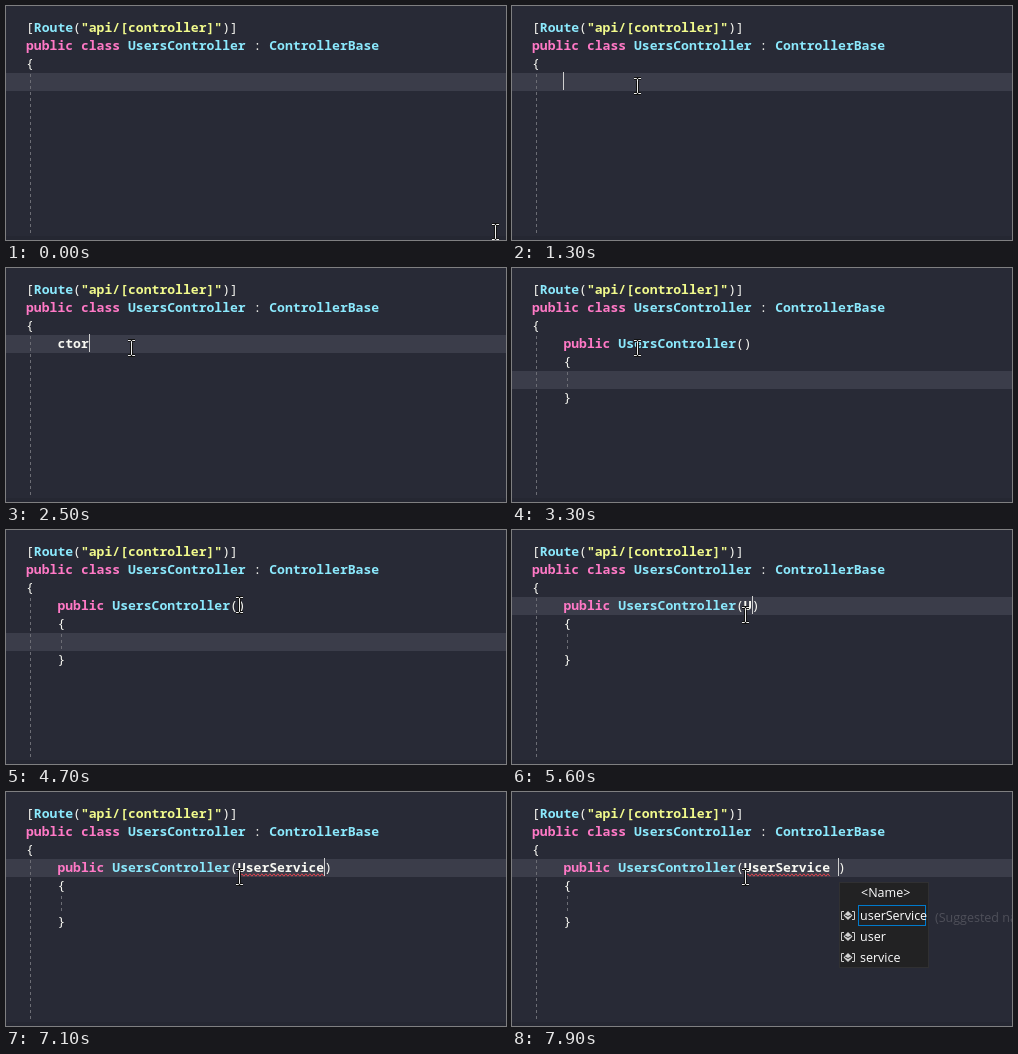
Animation, 500 px wide and 234 px high, one loop 8000 ms. Source, as an HTML page with a canvas:

```html
<!DOCTYPE html>
<html lang="en">
<head>
<meta charset="utf-8">
<title>Constructor snippet</title>
<style>
  html, body { margin: 0; width: 100%; height: 100%; overflow: hidden; background: #282a36; }
  canvas { display: block; }
</style>
</head>
<body>
<canvas id="stage" width="500" height="234"></canvas>
<script>
const ctx = document.getElementById('stage').getContext('2d', { alpha: false });
const LOOP = 8000, STEP = 100, LEFT = 20, LINE = 18, ROW = 21;
const CODE_FONT = '600 13.08px "Noto Sans Mono", monospace';
const PUNCTUATION_FONT = CODE_FONT.replace('600', '500');
const UI_FONT = '12.5px "Open Sans", sans-serif';
const PINK = '#ff79c6', CYAN = '#8be9fd', YELLOW = '#f1fa8c', WHITE = '#f8f8f2';
const ORANGE = '#f6c788', BLUE = '#007acc', DIM = '#565658', PANEL = '#222223';

// [start, typed text, where the text belongs]; each start also restarts the caret blink
const phases = [
  [300, '', 'class'], [1500, 'c', 'class'], [1700, 'ct', 'class'],
  [2200, 'cto', 'class'], [2300, 'ctor', 'class'],
  [2800, '', 'body'],
  [4800, '', 'args'], [5600, 'U', 'args'], [5800, 'Us', 'args'], [5900, 'User', 'args'],
  [7000, 'UserService', 'args'], [7400, 'UserService ', 'args'], [7500, 'UserService ', 'args']
];

// [time, x, y]
const pointerPath = [
  [0, 489, 226], [800, 125, 80], [3900, 125, 80],
  [4300, 184, 63], [4700, 233, 75], [4800, 233, 85], [LOOP, 233, 85]
];

const lineTop = line => 12 + LINE * line;

function rect(x, y, w, h, color) {
  ctx.fillStyle = color;
  ctx.fillRect(x, y, w, h);
}

function frame(x, y, w, h, color) {
  ctx.strokeStyle = color;
  ctx.lineWidth = 1;
  ctx.strokeRect(x + 0.5, y + 0.5, w - 1, h - 1);
}

function stroke(color, width, ...paths) {
  ctx.strokeStyle = color;
  ctx.lineWidth = width;
  ctx.beginPath();
  for (const [start, ...rest] of paths) {
    ctx.moveTo(...start);
    rest.forEach(p => ctx.lineTo(...p));
  }
  ctx.stroke();
}

function label(text, x, y, color = '#fff', font = UI_FONT) {
  ctx.font = font;
  ctx.fillStyle = color;
  ctx.fillText(text, x, y);
}

function columnX(col) {
  ctx.font = CODE_FONT;
  return LEFT + col * ctx.measureText('0').width;
}

function code(line, col, ...tokens) {
  for (const [text, color] of tokens) {
    const font = /\w/.test(text) ? CODE_FONT : PUNCTUATION_FONT;
    label(text, columnX(col), lineTop(line) + 14, color, font);
    col += text.length;
  }
}

function guide(x, top, bottom) {
  ctx.setLineDash([3, 3]);
  stroke('#6c6d75', 1, [[x + 0.5, top], [x + 0.5, bottom]]);
  ctx.setLineDash([]);
}

function diamond(x, y, r, color) {
  ctx.fillStyle = color;
  ctx.beginPath();
  ctx.moveTo(x - r, y);
  ctx.lineTo(x, y - r);
  ctx.lineTo(x + r, y);
  ctx.lineTo(x, y + r);
  ctx.fill();
}

function classIcon(x, y) {
  stroke(ORANGE, 1.2, [[x - 2, y - 1.5], [x + 4, y - 1.5]], [[x, y - 1], [x, y + 3.5], [x + 3, y + 3.5]]);
  diamond(x - 2.5, y - 2, 4.5, ORANGE);
  diamond(x + 4.5, y - 1, 2.8, ORANGE);
  diamond(x + 4, y + 4, 2.8, ORANGE);
}

function snippetIcon(x, y, color = '#c8c8c8') {
  frame(x - 5, y - 6, 11, 12, color);
}

function nameIcon(x, y) {
  stroke('#d0d0d0', 1,
    [[x - 4, y - 4.5], [x - 6.5, y - 4.5], [x - 6.5, y + 3.5], [x - 4, y + 3.5]],
    [[x + 4, y - 4.5], [x + 6.5, y - 4.5], [x + 6.5, y + 3.5], [x + 4, y + 3.5]]);
  diamond(x, y - 0.5, 4.5, '#d0d0d0');
  stroke(PANEL, 1, [[x - 3, y - 1], [x, y + 0.5], [x + 3, y - 1]]);
}

function filterBar(left, y, snippetColor) {
  const x = left + 14;
  const green = '#98e09a';
  for (const [sx, sy] of [[-1, -1], [1, -1], [-1, 1], [1, 1]]) {
    stroke(green, 1, [[x + sx * 6.5, y + sy * 3], [x + sx * 6.5, y + sy * 6.5], [x + sx * 3, y + sy * 6.5]]);
  }
  stroke(green, 2, [[x - 4, y], [x + 4, y]], [[x, y - 4], [x, y + 4]]);
  label('{ }', left + 38, y + 4, DIM);
  classIcon(left + 72, y);
  frame(left + 94, y - 1, 7, 5, DIM);
  rect(left + 98, y - 4, 5, 4, DIM);
  frame(left + 121, y - 2, 5, 5, DIM);
  stroke(DIM, 1, [[left + 126, y + 0.5], [left + 130, y + 0.5]]);
  frame(left + 130, y - 2, 4, 5, DIM);
  frame(left + 150, y, 5, 5, DIM);
  rect(left + 155, y - 4, 5, 4, DIM);
  stroke(DIM, 1, ...[-4.5, -1.5, 1.5, 4.5].map((dy, i) =>
    [[left + 177 + i % 2 * 4, y + dy], [left + 188 + i % 2 * 4, y + dy]]));
  snippetIcon(left + 212, y, snippetColor);
}

// Items starting with "*" carry the snippet icon.
function completionList(left, right, items, selected, snippetColor) {
  const top = 90, footer = top + items.length * ROW + 1;
  rect(left, top, right - left, footer - top + 28, PANEL);
  rect(left, footer + 1, right - left, 27, '#29292a');
  frame(left, top, right - left, footer - top + 28, '#323234');
  items.forEach((item, i) => {
    const y = top + i * ROW;
    if (i === selected) rect(left + 19, y, right - left - 19, ROW, BLUE);
    const isSnippet = item[0] === '*';
    (isSnippet ? snippetIcon : classIcon)(left + 9, y + 10);
    label(item.replace('*', ''), left + 21, y + 15);
  });
  filterBar(left, footer + 14, snippetColor);
}

function tip(x, y, w, h, opacity, draw) {
  ctx.globalAlpha = opacity;
  rect(x, y, w, h, '#424245');
  frame(x, y, w, h, '#4d4d50');
  draw();
  ctx.globalAlpha = 1;
}

function nameList() {
  rect(327, 90, 90, 86, PANEL);
  frame(327, 90, 90, 86, '#303032');
  label('<Name>', 349, 105);
  frame(346, 113, 68, 21, BLUE);
  ['userService', 'user', 'service'].forEach((name, i) => {
    nameIcon(336, 124 + ROW * i);
    label(name, 348, 128 + ROW * i);
  });
}

function popups(t) {
  const between = (from, to) => t >= from && t < to;
  if (between(1600, 1700)) {
    completionList(53, 279, ['*class', '*const', '*ctor', 'Console', 'Controller', 'ControllerBase', 'Convert', 'CurrentUser'], 0);
  }
  if (between(1700, 2500)) {
    completionList(53, 279, ['*ctor', 'CookieTempDataProviderOptions', 'ApiConventionTypeAttribute'], 0);
  }
  if (between(2300, 2500)) {
    tip(280, 90, 221, 59, 1, () => [
      'ctor', 'Code snippet for constructor', "Note: Tab twice to insert the 'ctor' snippet."
    ].forEach((text, i) => label(text, 286, 106 + 18 * i)));
  }
  if (between(4900, 5600)) {
    tip(233, 95, 237, 25, t < 5000 ? 0.5 : 1, () => {
      classIcon(244, 107);
      label('UsersController', 255, 112, CYAN);
      const x = 255 + ctx.measureText('UsersController').width;
      label('.UsersController()', x, 112);
    });
  }
  if (between(5800, 5900)) {
    completionList(233, 487, ['*using', 'UserDto', 'UserIdentityExtensions', 'UsersController', 'UserService', 'UriBuilder', 'CurrentUser'], 4, DIM);
  }
  if (between(5900, 7000)) {
    completionList(233, 487, ['UserDto', 'UserIdentityExtensions', 'UsersController', 'UserService', 'CurrentUser'], 3, DIM);
  }
  if (between(6300, 7000)) {
    const opacity = Math.min(1, (t - 6200) / 300);
    tip(487, 153, 30, 25, opacity, () => label('class', 490, 170, PINK));
  }
  if (t >= 7400) nameList();
  if (t >= 7900) label('(Suggested name)', 423, 130, '#4f505a');
}

function squiggle(from, to, y) {
  const points = [];
  for (let x = from, i = 0; x <= to; x += 2, i++) points.push([x, y + (i % 2 ? 1.2 : -1.2)]);
  stroke('#e0454f', 1, points);
}

function pointer(t) {
  const i = pointerPath.findIndex(p => p[0] > t);
  const [t0, x0, y0] = pointerPath[i - 1], [t1, x1, y1] = pointerPath[i];
  const k = (t - t0) / (t1 - t0), e = k * k * (3 - 2 * k);
  const x = Math.round(x0 + (x1 - x0) * e) + 0.5, y = Math.round(y0 + (y1 - y0) * e);
  const shape = [
    [[x - 3.5, y - 7.5], [x - 1, y - 7.5], [x, y - 6.5], [x + 1, y - 7.5], [x + 3.5, y - 7.5]],
    [[x, y - 6.5], [x, y + 6.5]],
    [[x - 3.5, y + 7.5], [x - 1, y + 7.5], [x, y + 6.5], [x + 1, y + 7.5], [x + 3.5, y + 7.5]]
  ];
  stroke('#111', 3, ...shape);
  stroke('#eee', 1, ...shape);
}

function draw(t) {
  const [start, typed, place] = phases.findLast(p => p[0] <= t) || phases[0];
  const expanded = place !== 'class';
  const caretLine = place === 'body' ? 5 : 3;
  const caretCol = { class: 4, body: 8, args: 27 }[place] + typed.length;

  rect(0, 0, 500, 234, '#282a36');
  rect(0, 230, 500, 4, '#252732');
  rect(0, lineTop(caretLine) + 1, 500, LINE, '#3b3d4a');
  if (t < 2800 || t >= 3100) guide(24, 68, 230);
  if (expanded) guide(55, 104, 121);

  code(0, 0, ['[', WHITE], ['Route', CYAN], ['(', WHITE], ['"api/[controller]"', YELLOW], [')]', WHITE]);
  code(1, 0, ['public class ', PINK], ['UsersController', CYAN], [' : ', WHITE], ['ControllerBase', CYAN]);
  code(2, 0, ['{', WHITE]);
  if (expanded) {
    code(3, 4, ['public ', PINK], ['UsersController', CYAN], ['(', WHITE], [typed, WHITE], [')', WHITE]);
    code(4, 4, ['{', WHITE]);
    code(6, 4, ['}', WHITE]);
  } else {
    code(3, 4, [typed, WHITE]);
  }
  if (t >= 7100) squiggle(columnX(27), columnX(38), 83);

  const blink = (t - start + 1000) % 1000;
  if (blink < 500) rect(Math.round(columnX(caretCol)), lineTop(caretLine), 1, LINE, '#d0d0d0');

  popups(t);
  pointer(t);
}

const begin = performance.now();
function tick() {
  const t = (performance.now() - begin) % LOOP;
  draw(Math.floor(t / STEP) * STEP);
  requestAnimationFrame(tick);
}
tick();
</script>
</body>
</html>
```
